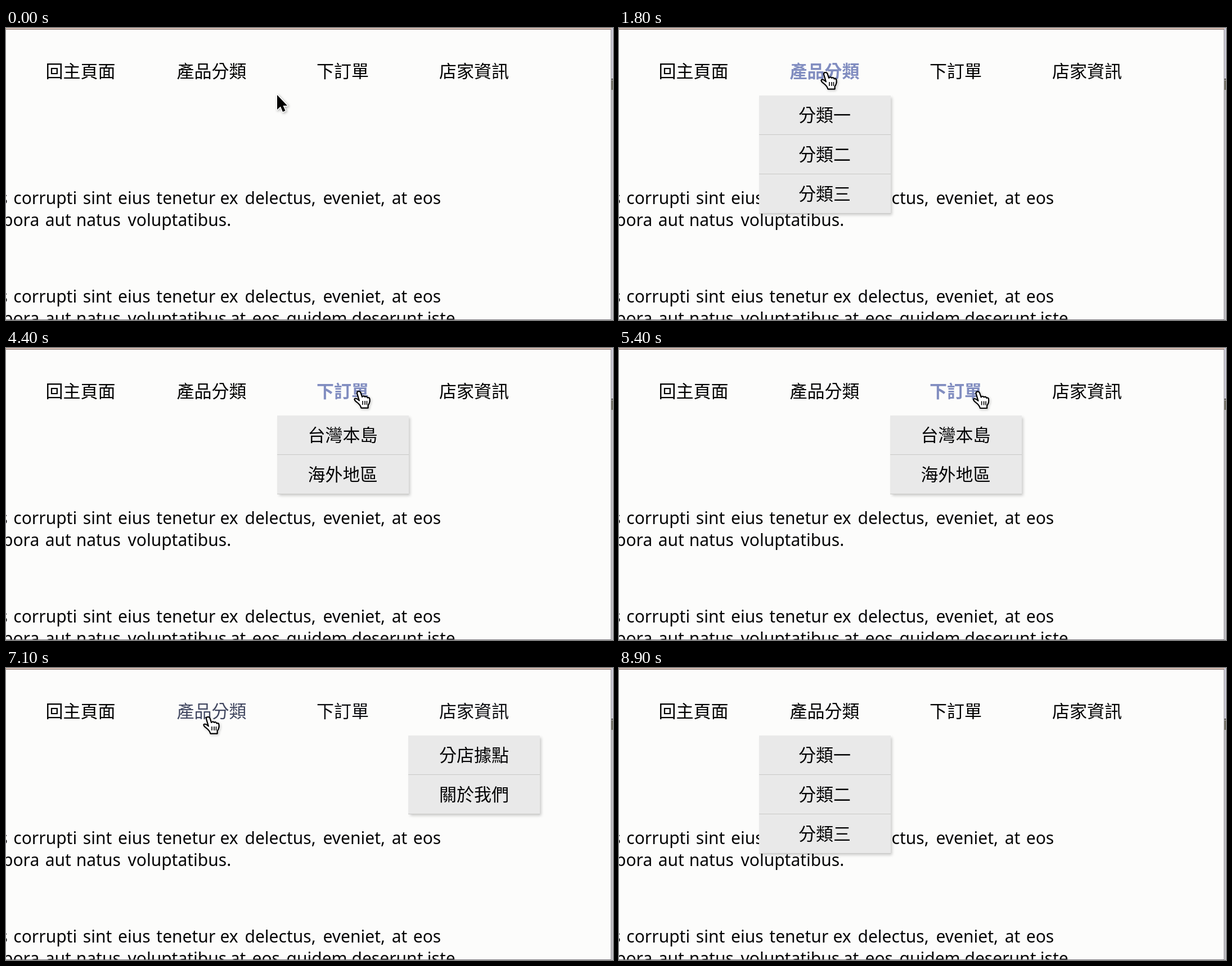
An HTML page with a canvas that plays this animation: 1079 by 519 pixels, repeating every 9000 ms.

```html
<!DOCTYPE html>
<html lang="zh-Hant">
<head>
<meta charset="utf-8">
<style>
  html, body { margin: 0; width: 100%; height: 100%; overflow: hidden; background: #fcfcfb; }
  canvas { display: block; }
</style>
</head>
<body>
<canvas id="stage" width="1079" height="519"></canvas>
<script>
const ctx = document.getElementById('stage').getContext('2d');
const LOOP = 9000, STEP = 100, SLIDE = 400, FADE = 300;
const CJK = '31px "Noto Sans CJK TC", "Noto Sans CJK JP", "Noto Sans CJK", sans-serif';
const LATIN = '500 30px "Noto Sans", "Open Sans", sans-serif';
const INK = '#040405';
const MENU_TOP = 120, MENU_WIDTH = 234, ITEM = 70;

// toggles: [click time, open state]
const nav = [
  { title: '回主頁面', x: 132.5, items: [], toggles: [] },
  { title: '產品分類', x: 365.5, items: ['分類一', '分類二', '分類三'],
    toggles: [[800, 1], [1800, 0], [2350, 1], [2780, 0], [7100, 1], [7700, 0], [8150, 1]] },
  { title: '下訂單', x: 598.5, items: ['台灣本島', '海外地區'],
    toggles: [[3950, 1], [4400, 0], [4900, 1], [5750, 0]] },
  { title: '店家資訊', x: 832, items: ['分店據點', '關於我們'],
    toggles: [[5750, 1], [7100, 0]] }
];

// pointer path: [time, x, y]
const path = [
  [0, 482, 119], [600, 372, 82], [1000, 362, 68], [1400, 362, 68], [1600, 366, 79],
  [2400, 366, 79], [2900, 388, 72], [3300, 388, 72], [3800, 620, 80], [4350, 626, 77],
  [5350, 626, 77], [5700, 840, 86], [6750, 840, 86], [7050, 358, 87], [8200, 358, 87],
  [8420, 590, 80], [8600, 650, -40], [9000, 650, -40]
];

// word starts, so the spacing follows the page
const opening = [[-11.5, 's'], [13.3, 'corrupti'], [136.8, 'sint'], [199, 'eius'], [267.3, 'tenetur'],
  [380.5, 'ex'], [424.5, 'delectus,'], [563.5, 'eveniet,'], [685.7, 'at'], [723.8, 'eos']];
const closing = [[-6, 'pora'], [69.7, 'aut'], [124.7, 'natus'], [216.5, 'voluptatibus.']];
const lines = [
  [313, opening],
  [352, closing],
  [488, opening],
  [527, [...closing, [398.7, 'at'], [437.5, 'eos'], [498.5, 'quidem'],
    [614.5, 'deserunt'], [748.8, 'iste']]]
];

const arrow = new Path2D('M0 0V26L6 20.5L10 30L14.5 28L10.5 19H18Z');
const hand = new Path2D('M-2 3Q-2 0 1 0Q4 0 5 4L7 10Q10 7 12 10Q15 8 16.5 11.5' +
  'Q20.5 10 20.5 15Q21 20 17.5 25V29.5H5.5Q4 24 -2 19.5Q-8 15 -6 13Q-3 12 2 16.5Z');
const creases = new Path2D('M8 17V24M12 17V24M15.5 17V24');

const clamp = v => Math.max(0, Math.min(1, v));
const swing = p => 0.5 - Math.cos(p * Math.PI) / 2;

function pointerAt(t) {
  let i = 1;
  while (i < path.length - 1 && path[i][0] <= t) i++;
  const [t0, x0, y0] = path[i - 1], [t1, x1, y1] = path[i];
  const p = swing(clamp((t - t0) / (t1 - t0)));
  return { x: x0 + (x1 - x0) * p, y: y0 + (y1 - y0) * p };
}

function isOver(entry, { x, y }) {
  return Math.abs(x - entry.x) < entry.title.length * 15.5 + 8 && y > 50 && y < 104;
}

// a linear colour transition equals the share of recent time spent hovering
function hoverAt(entry, t) {
  const samples = 12;
  let hits = 0;
  for (let i = 0; i < samples; i++) {
    if (isOver(entry, pointerAt(Math.max(0, t - FADE * i / samples)))) hits++;
  }
  return hits / samples;
}

function opennessAt(toggles, t) {
  let open = 0;
  for (const [start, target] of toggles) {
    if (t >= start) open = (1 - target) + (2 * target - 1) * swing(clamp((t - start) / SLIDE));
  }
  return open;
}

function rect(color, x, y, w, h) {
  ctx.fillStyle = color;
  ctx.fillRect(x, y, w, h);
}

function shadow(color, blur, offset) {
  ctx.shadowColor = color;
  ctx.shadowBlur = blur;
  ctx.shadowOffsetX = ctx.shadowOffsetY = offset;
}

function drawPage() {
  rect('#fcfcfb', 0, 0, 1079, 519);
  ctx.font = LATIN;
  ctx.textAlign = 'left';
  ctx.fillStyle = INK;
  for (const [y, words] of lines) {
    for (const [x, word] of words) ctx.fillText(word, x, y);
  }
}

function drawEdges() {
  rect('#dcc0b4', 0, 0, 1079, 2);
  rect('#857c7a', 0, 2, 1076, 1);
  rect('#cbcad6', 1076, 0, 3, 90);
  rect('#c0bfc4', 1076, 90, 3, 429);
  rect('#98959a', 1075, 3, 1, 516);
  rect('#55534f', 1076, 90, 3, 2);
  rect('#77746a', 1076, 93, 3, 17);
  rect('#77747a', 0, 518, 1076, 1);
}

function drawTitle(entry, t) {
  const h = hoverAt(entry, t);
  ctx.font = (h > 0.5 ? 'bold ' : '500 ') + CJK;
  ctx.textAlign = 'center';
  ctx.fillStyle = `rgb(${129 * h}, ${141 * h}, ${192 * h})`;
  ctx.fillText(entry.title, entry.x, 87.5);
}

function drawMenu(entry, t) {
  const height = entry.items.length * ITEM * opennessAt(entry.toggles, t);
  if (height < 1) return;
  const left = Math.round(entry.x - MENU_WIDTH / 2);
  ctx.save();
  shadow('rgba(0,0,0,.2)', 5, 2.5);
  rect('#e9e9e9', left, MENU_TOP, MENU_WIDTH, height);
  ctx.restore();

  ctx.save();
  ctx.beginPath();
  ctx.rect(left, MENU_TOP, MENU_WIDTH, height);
  ctx.clip();
  ctx.font = '500 ' + CJK;
  ctx.textAlign = 'center';
  entry.items.forEach((label, i) => {
    const y = MENU_TOP + i * ITEM;
    rect('#c8c8c6', left, y + ITEM - 1, MENU_WIDTH, 1);
    ctx.fillStyle = INK;
    ctx.fillText(label, entry.x, y + 45.5);
  });
  ctx.restore();
}

function drawPointer(t) {
  const p = pointerAt(t);
  const linked = nav.some(entry => isOver(entry, p));
  const shape = linked ? hand : arrow;
  ctx.save();
  ctx.translate(p.x, p.y);
  ctx.lineJoin = 'round';
  shadow('rgba(0,0,0,.35)', 4, 1.5);
  ctx.strokeStyle = linked ? '#000' : '#fff';
  ctx.lineWidth = linked ? 2 : 3;
  ctx.stroke(shape);
  shadow('transparent', 0, 0);
  ctx.fillStyle = linked ? '#fff' : '#000';
  ctx.fill(shape);
  if (linked) {
    ctx.stroke(shape);
    ctx.lineWidth = 1.6;
    ctx.stroke(creases);
  }
  ctx.restore();
}

function draw(now) {
  const t = Math.floor((now % LOOP) / STEP) * STEP;
  drawPage();
  nav.forEach(entry => drawTitle(entry, t));
  nav.forEach(entry => drawMenu(entry, t));
  drawEdges();
  drawPointer(t);
}

const start = performance.now();
function tick() {
  draw(performance.now() - start);
  requestAnimationFrame(tick);
}
tick();
</script>
</body>
</html>
```
